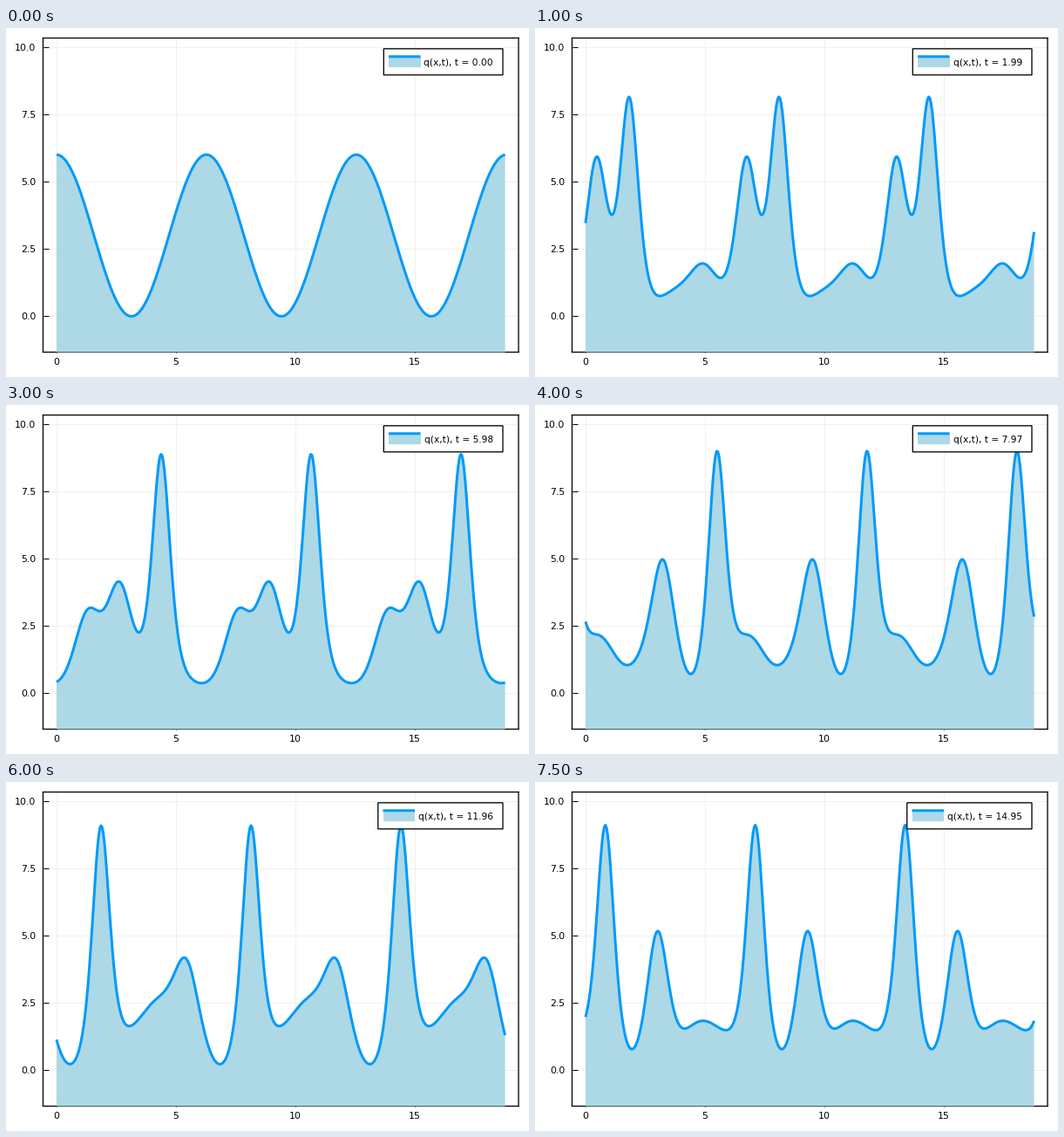
A matplotlib script that plays this animation: 600 px wide and 400 px high, repeating every 8000 ms.

```python
import numpy as np
import matplotlib.pyplot as plt
from matplotlib.animation import FuncAnimation
from matplotlib.patches import Rectangle

# Periodic KdV flow: q_t + 6 q q_x + q_xxx = 0, q(x, 0) = 3 + 3 cos x
FRAMES, INTERVAL = 16, 500
DT = 0.99687            # model time between frames
STEPS = 2400            # solver steps per frame
MODES = 64
POINTS = 3 * 128        # three periods
MEAN = 3.0
PX = 0.72               # points per pixel at 100 dpi
THIN = 1.3 * PX
BLUE, FILL = "#009AF9", "#ADD8E6"

k = np.arange(MODES // 2 + 1)
kept = k <= MODES // 3


def solve():
    """Fourier states at each frame, in the frame moving with the mean flow."""
    h = DT / STEPS
    half = np.exp(0.5j * h * k**3)
    full = half**2
    gain = -3j * k * kept

    def force(v):
        w = np.fft.irfft(v)
        return gain * np.fft.rfft(w * w)

    v = np.fft.rfft(3 * np.cos(2 * np.pi * np.arange(MODES) / MODES)) * kept
    states = [v]
    for _ in range(FRAMES - 1):
        for _ in range(STEPS):
            ev = half * v
            a = force(v)
            b = force(ev + h / 2 * half * a)
            c = force(ev + h / 2 * b)
            d = force(full * v + h * half * c)
            v = full * v + h / 6 * (full * a + 2 * half * (b + c) + d)
        states.append(v)
    return states


x = np.arange(POINTS) * 6 * np.pi / POINTS
basis = np.exp(1j * np.outer(x, k))


def profile(v, t):
    shifted = v * np.exp(-6j * MEAN * t * k)
    return MEAN + 2 / MODES * (basis @ shifted).real


curves = [profile(v, i * DT) for i, v in enumerate(solve())]

plt.rcParams["font.family"] = "DejaVu Sans"
fig = plt.figure(figsize=(6, 4), dpi=100, facecolor="white")

left, right, top, bottom = 42.5, 588, 11.5, 371.5
ax = fig.add_axes([left / 600, 1 - bottom / 400,
                   (right - left) / 600, (bottom - top) / 400])
floor = -1.33
ax.set_xlim(-0.03 * x[-1], 1.03 * x[-1])
ax.set_ylim(floor, 10.33)
ax.set_xticks([0, 5, 10, 15])
ax.set_yticks([0, 2.5, 5, 7.5, 10], ["0.0", "2.5", "5.0", "7.5", "10.0"])
ax.set_axisbelow(True)
ax.grid(color="#f0f0f0", linewidth=PX)
ax.tick_params(direction="in", length=5.5 * PX, width=PX, labelsize=11 * PX)
ax.tick_params(axis="x", pad=7 * PX)
ax.tick_params(axis="y", pad=8 * PX)
for spine in ax.spines.values():
    spine.set(linewidth=THIN, zorder=0.6, snap=False)

outline = np.concatenate([[x[0]], x, [x[-1]]])
area, = ax.fill(outline, np.full(outline.size, floor), color=FILL,
                linewidth=0, zorder=2, snap=False, clip_on=False)
line, = ax.plot(x, curves[0], color=BLUE, linewidth=3 * PX, zorder=3,
                solid_capstyle="butt", solid_joinstyle="round")

# Legend, placed in stage pixels
key = fig.add_axes([0, 0, 1, 1])
key.set(xlim=(0, 600), ylim=(400, 0))
key.axis("off")
box = key.add_patch(Rectangle((433.3, 23.8), 136.7, 30, facecolor="white",
                              edgecolor="black", linewidth=THIN, snap=False))
swatch = key.add_patch(Rectangle((439, 33), 36.5, 12, color=FILL, linewidth=0))
dash, = key.plot([], [], color=BLUE, linewidth=3 * PX,
                 solid_capstyle="butt", snap=False)
label = key.text(559, 43, "", fontsize=10.6 * PX, ha="right", va="baseline")


def draw(i):
    t = i * DT
    q = curves[i]
    line.set_ydata(q)
    area.set_xy(np.column_stack([outline, np.concatenate([[floor], q, [floor]])]))
    shift = 6.5 if t >= 10 else 0
    box.set_x(433.3 - shift)
    box.set_width(136.7 + shift)
    swatch.set_x(439 - shift)
    dash.set_data([439 - shift, 475.5 - shift], [32.75, 32.75])
    label.set_text(f"q(x,t), t = {t:.2f}")
    return area, line, box, swatch, dash, label


anim = FuncAnimation(fig, draw, frames=FRAMES, interval=INTERVAL,
                     repeat=True, repeat_delay=0)
plt.show()
```
